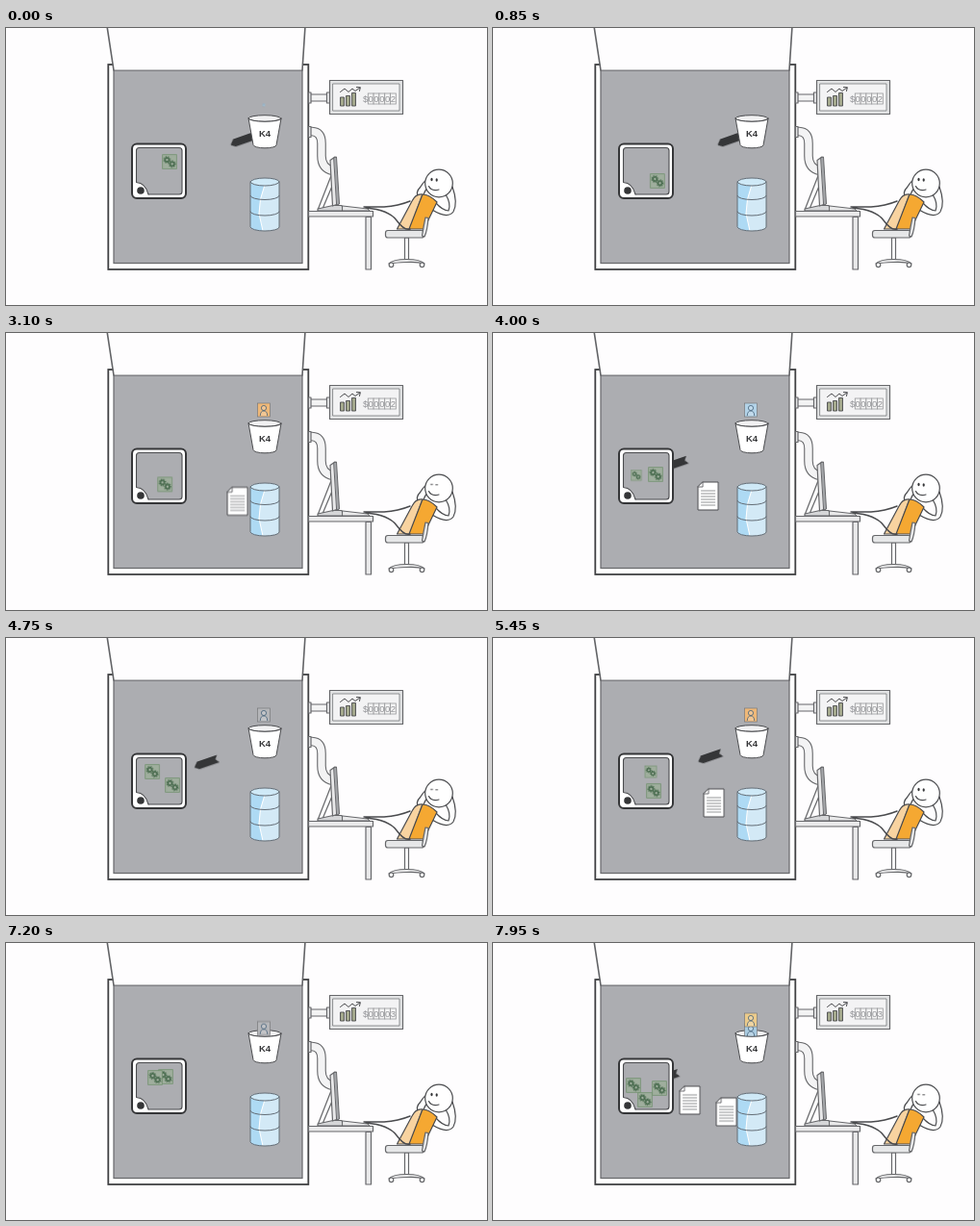
Animation, 500 px wide and 288 px high, one loop 8000 ms. Source, as an HTML page without scripts:

```html
<!DOCTYPE html>
<html lang="en">
<head>
<meta charset="utf-8">
<title>Workers, bucket and database</title>
<style>
html, body { margin: 0; width: 100%; height: 100%; overflow: hidden; background: #fff; }
svg { display: block; width: 500px; height: 288px; font-family: "Liberation Sans", Arial, sans-serif; }
.ink { fill: none; stroke: #4a4b4e; stroke-width: 1.2; stroke-linecap: round; stroke-linejoin: round; }
.soft { stroke: #66676a; }

/* Each traveller runs once per loop, starting at --t milliseconds */
.run { animation: 8s linear calc(var(--t) * 1ms - 8000ms) infinite; }
.arrow { animation-name: arrow; }
.doc { animation-name: doc; }
.pic { animation-name: pic; }
/* Travellers cut by the loop point show in one half only */
.early { animation: half 8s step-end infinite; }
.late { animation: half 8s step-end -4s infinite; }

@keyframes arrow {
  0% { transform: translate(270px, 108px); opacity: 1; }
  8.75% { transform: translate(172px, 142px); opacity: 1; }
  8.76%, 100% { transform: translate(172px, 142px); opacity: 0; }
}
@keyframes doc {
  0% { transform: translate(160px, 138px); opacity: 1; }
  12.5% { transform: translate(260px, 170px); opacity: 1; }
  12.51%, 100% { transform: translate(260px, 170px); opacity: 0; }
}
@keyframes pic {
  0% { transform: translate(268px, 80px) scale(0); opacity: 1; }
  2.5%, 5.5% { transform: translate(268px, 80px); opacity: 1; }
  10% { transform: translate(268px, 108px); opacity: 1; }
  10.01%, 100% { transform: translate(268px, 108px); opacity: 0; }
}
@keyframes half { 0% { opacity: 1; } 50%, 100% { opacity: 0; } }

.gear { animation: 8s linear infinite; }
.g1 { animation-name: g1; }
.g2 { animation-name: g2; }
.g3 { animation-name: g3; }
@keyframes g1 {
  0% { transform: translate(170px, 139px); }
  10.6% { transform: translate(171px, 159px); }
  18% { transform: translate(150px, 160px); }
  22% { transform: translate(147px, 152px); }
  26.9% { transform: translate(162px, 141px); }
  32% { transform: translate(171px, 140px); }
  39% { transform: translate(165px, 158px); }
  50% { transform: translate(169px, 147px); }
  58% { transform: translate(174px, 152px); }
  68.1% { transform: translate(167px, 159px); }
  80% { transform: translate(177px, 142px); }
  90% { transform: translate(166px, 139px); }
  99.4%, 100% { transform: translate(173px, 151px); }
}
@keyframes g2 {
  0%, 47.5% { transform: translate(149px, 148px) scale(0); }
  50% { transform: translate(149px, 148px) scale(.72); }
  51.5% { transform: translate(149px, 147px); }
  58% { transform: translate(150px, 139px); }
  66% { transform: translate(162px, 139px); }
  68.1% { transform: translate(164px, 139px) scale(.8); }
  70% { transform: translate(163px, 139px); }
  80% { transform: translate(147px, 149px); }
  90% { transform: translate(155px, 140px); }
  99.4%, 100% { transform: translate(146px, 148px); }
}
@keyframes g3 {
  0%, 90% { transform: translate(166px, 160px) scale(0); }
  93% { transform: translate(164px, 161px); }
  99.4%, 100% { transform: translate(158px, 163px); }
}
.spin { animation: spin 2s linear infinite; }
.back { animation-direction: reverse; }
@keyframes spin { to { transform: rotate(360deg); } }

.eye { transform-box: fill-box; transform-origin: center; animation: blink 8s step-end infinite; }
@keyframes blink {
  0%, 18.125%, 30.6%, 39.4%, 48.1%, 60.6%, 84.4% { transform: none; }
  16.25%, 28.75%, 37.5%, 46.25%, 58.75%, 82.5%, 98.1%, 100% { transform: scale(1.5, .3); }
}
.roll { animation: roll 8s ease-in-out infinite; }
@keyframes roll {
  0%, 62% { transform: none; }
  65.6%, 100% { transform: translateY(-11px); }
}
.digits { font-size: 9.5px; fill: #939498; text-anchor: middle; }
</style>
</head>
<body>
<svg viewBox="0 0 500 288">
<defs>
  <g id="arrow"><path transform="rotate(-19)" d="M-13.5 1L-9-4H13L10 0 13 4.2H-9Z" fill="#353638"/></g>
  <g id="doc">
    <path class="ink" style="fill:#fff;stroke-width:1" d="M5 0H21V29H0V5Z"/>
    <path class="ink" style="stroke-width:.8" d="M0 5H5V0"/>
    <path d="M3 9H18M3 12H18M3 15H18M3 18H18M3 21H18M3 24H18" stroke="#8a8b8e" stroke-width=".9"/>
  </g>
  <g id="pic">
    <rect x="-6.5" y="-7" width="13" height="14" fill="currentColor" stroke="#77787b" stroke-width=".7"/>
    <g fill="#fff" fill-opacity=".2" stroke="#46627a" stroke-width=".8">
      <circle cy="-2" r="2.6"/>
      <path d="M-3.7 6Q-3.5 1 0 1T3.7 6"/>
    </g>
  </g>
  <g id="cog" fill="none" stroke="#46694c">
    <circle r="2.1" stroke-width="1.5"/>
    <circle r="3.2" stroke-width="1.3" stroke-dasharray="1.3 1.21"/>
  </g>
  <g id="gear">
    <rect x="-7.3" y="-7.3" width="14.6" height="14.6" fill="#9fae9d" stroke="#72916f" stroke-width=".8"/>
    <g transform="translate(-2.6 -2)"><g class="spin"><use href="#cog"/></g></g>
    <g transform="translate(2.7 2.3)"><g class="spin back"><use href="#cog"/></g></g>
  </g>
  <rect id="cell" y="68" width="5.8" height="11" fill="#f4f4f4" stroke="#97989b" stroke-width=".8"/>
  <clipPath id="slot"><rect x="399.5" y="68" width="6" height="11"/></clipPath>
  <clipPath id="inside"><rect x="136" y="125" width="46.5" height="47.5"/></clipPath>
  <clipPath id="can"><path d="M254 160A15 4 0 0 1 284 160V207A15 4 0 0 1 254 207Z"/></clipPath>
</defs>

<rect width="500" height="288" fill="#fefdfe"/>

<!-- Room -->
<rect x="106.3" y="38" width="208" height="213" fill="#fff" stroke="#414244" stroke-width="1.8"/>
<rect x="112" y="44" width="196" height="200.5" fill="#acadb1" stroke="#66676a" stroke-width="1.2"/>
<path d="M105 -2L112 43.3H308L311 -2Z" fill="#fefdfe"/>
<path class="ink" style="stroke:#626366;stroke-width:1.6" d="M105 -2L112 44M311 -2L308 44"/>

<!-- Upper pipe and display -->
<g class="ink soft" style="fill:#f3f3f4">
  <rect x="316" y="69" width="20" height="7"/>
  <rect x="314.5" y="67" width="2.500" height="11"/>
  <rect x="333.500" y="67" width="3" height="11"/>
  <rect x="336.500" y="54.500" width="76" height="35" style="fill:#e2e3e4"/>
  <rect x="340" y="58" width="69" height="28" style="fill:#f3f3f4;stroke-width:.7"/>
</g>
<path fill="#a3a88c" stroke="#4a4b4e" stroke-width=".9" d="M347.500 72H351.500V81H347.500ZM353.500 70.500H357.500V81H353.500ZM359.500 67.500H363.500V81H359.500Z"/>
<path class="ink" style="stroke-width:1" d="M347.500 66.500L352 63 356 66.500 360 63 363 65.500 368 62M364.500 61.500L368.300 61.800 367.500 65.500"/>
<g class="digits">
  <text x="373.700" y="77">$</text>
  <use href="#cell" x="376.300"/><use href="#cell" x="382.100"/><use href="#cell" x="387.900"/><use href="#cell" x="393.700"/><use href="#cell" x="399.500"/>
  <text y="77" x="379.200">0</text><text y="77" x="385">0</text><text y="77" x="390.800">0</text><text y="77" x="396.600">0</text>
  <g clip-path="url(#slot)"><g class="roll"><text x="402.400" y="77">2</text><text x="402.400" y="88">3</text></g></g>
</g>

<!-- Lower pipe, monitor and desk -->
<g fill="none">
  <path id="hose" d="M316 107.500H318Q328 108 328 120V133Q328 146 340 148.500" stroke="#66676a" stroke-width="9.600"/>
  <path d="M316 107.500H318Q328 108 328 120V133Q328 146 340 148.500" stroke="#f3f3f4" stroke-width="7.400"/>
</g>
<g class="ink soft">
  <rect style="fill:#f3f3f4" x="314.500" y="102.500" width="2.500" height="11"/>
  <path style="fill:#e9e9ea" d="M374 196.500H379.500V251H374Z"/>
  <path style="fill:#e9e9ea" d="M314.500 190.500H381.500V196H314.500Z"/>
  <path style="fill:#fff" d="M339 151L324.500 188H329L340 162Z"/>
  <path style="fill:#d5d6d8" d="M324 190V188L340 184.500H349L351 190Z"/>
  <path style="fill:#e9e9ea" d="M337 137.500L342 134 345 183 339.500 185Z"/>
  <path style="fill:#a7a9ac;stroke-width:1" d="M341 134.800L343.500 134 346.500 183 344 184Z"/>
  <path style="fill:#e9e9ea;stroke-width:1" d="M350 185L376 188 378 190H350Z"/>
</g>

<!-- Chair and person -->
<g class="ink">
  <g class="soft">
    <path style="fill:#fff" d="M414.500 218H418.500V241H414.500Z"/>
    <path style="fill:#e9e9ea" d="M398 245Q402 240.500 416.500 240.500T435 245Q428 243 416.500 243.500T398 245Z"/>
    <g style="fill:#fff"><circle cx="400.500" cy="246.300" r="2.300"/><circle cx="432.500" cy="246.300" r="2.300"/></g>
  </g>
  <path style="fill:#fff" d="M429 176Q425 171 431 165Q435 158 440 157V164Q435 169 434 174Z"/>
  <path style="fill:#fff" d="M446 181Q454 190 460 190Q463 183 457 173L464 165Q470 182 465 191Q459 199 443 189Z"/>
  <path style="fill:#f8d3a0" d="M406.500 209L422 180Q426 172 433 173L420 209Z"/>
  <path style="fill:#f5a832" d="M419 209L433 173Q440 173 448 181L434.500 209Z"/>
  <path style="stroke-width:1.400" d="M372 186H393Q408 185 420 180M374 187Q398 189 406 200T420 209"/>
  <g class="soft">
    <rect style="fill:#e6e7e8" x="394.500" y="210.500" width="40" height="7.500" rx="2.500"/>
    <path style="fill:#e6e7e8" d="M432.500 216Q434 206 436 197L439 197.500Q438 211 435 217Z"/>
  </g>
  <circle style="fill:#fff" cx="450" cy="161.500" r="14.300"/>
  <path d="M439.500 164.500Q442 170 450 168"/>
</g>
<g fill="#353638">
  <ellipse class="eye" cx="442.500" cy="157.500" rx="1.100" ry="1.700"/>
  <ellipse class="eye" cx="447.700" cy="158" rx="1.100" ry="1.700"/>
</g>

<!-- Arrows and pages pass behind the containers -->
<g class="early"><use href="#arrow" class="run arrow" style="--t:-171"/></g>
<use href="#arrow" class="run arrow" style="--t:679"/>
<use href="#arrow" class="run arrow" style="--t:2094"/>
<use href="#arrow" class="run arrow" style="--t:3429"/>
<use href="#arrow" class="run arrow" style="--t:4310"/>
<use href="#arrow" class="run arrow" style="--t:5135"/>
<use href="#arrow" class="run arrow" style="--t:6085"/>
<use href="#doc" class="run doc" style="--t:950"/>
<use href="#doc" class="run doc" style="--t:2400"/>
<use href="#doc" class="run doc" style="--t:3470"/>
<use href="#doc" class="run doc" style="--t:4860"/>
<use href="#doc" class="run doc" style="--t:5870"/>
<g class="late">
  <use href="#arrow" class="run arrow" style="--t:7314"/>
  <use href="#doc" class="run doc" style="--t:7230"/>
  <use href="#doc" class="run doc" style="--t:7610"/>
</g>

<!-- Worker box -->
<rect x="131" y="120.500" width="56" height="56.500" rx="5" fill="#fff" stroke="#353638" stroke-width="2"/>
<rect x="135.500" y="124.500" width="47.500" height="48.500" rx="3" fill="#acadb1" stroke="#4a4b4e" stroke-width="1.100"/>
<g clip-path="url(#inside)">
  <use href="#gear" class="gear g1"/>
  <use href="#gear" class="gear g2"/>
  <use href="#gear" class="gear g3"/>
</g>
<path d="M134 160Q145 160 148 174H136Q134 174 134 172Z" fill="#fff"/>
<path class="ink" style="stroke-width:1.100" d="M135.500 160.500Q145 161 148 173"/>
<circle cx="140" cy="169" r="3.800" fill="#353638"/>

<!-- Bucket with pictures dropping in -->
<ellipse class="ink" style="fill:#f1f1f2;stroke-width:1" cx="269" cy="94" rx="17" ry="3.300"/>
<g class="early"><use href="#pic" class="run pic" style="--t:-40" color="#a9cbe0"/></g>
<use href="#pic" class="run pic" style="--t:1440" color="#b5b6b9"/>
<use href="#pic" class="run pic" style="--t:2700" color="#efb878"/>
<use href="#pic" class="run pic" style="--t:3680" color="#b3d3e8"/>
<use href="#pic" class="run pic" style="--t:4450" color="#b5b6b9"/>
<use href="#pic" class="run pic" style="--t:5130" color="#efb878"/>
<use href="#pic" class="run pic" style="--t:5820" color="#948b8b"/>
<use href="#pic" class="run pic" style="--t:6000" color="#86aecb"/>
<use href="#pic" class="run pic" style="--t:6650" color="#b5b6b9"/>
<g class="late">
  <use href="#pic" class="run pic" style="--t:7370" color="#a9cbe0"/>
  <use href="#pic" class="run pic" style="--t:7550" color="#eccb8b"/>
</g>
<path class="ink" style="fill:#fff;stroke-width:1" d="M252 94A17 3.300 0 0 0 286 94L281 121.800A12 3 0 0 1 257 121.800Z"/>
<text x="269" y="113" font-size="9.500" font-weight="bold" text-anchor="middle" fill="#353638">K4</text>

<!-- Database -->
<g clip-path="url(#can)">
  <rect x="254" y="155" width="30" height="57" fill="#d3e9f6"/>
  <path d="M254 160L269 163Q263 178 263 193L267 211H254Z" fill="#aedaf4"/>
  <path d="M269 163Q263 178 263 193L267 211" fill="none" stroke="#fff" stroke-width="1"/>
</g>
<ellipse cx="269" cy="160" rx="15" ry="4" fill="#cfe9f7"/>
<path class="ink" style="stroke:#636c75;stroke-width:1" d="M254 160A15 4 0 0 1 284 160V207A15 4 0 0 1 254 207ZM254 160A15 4 0 0 0 284 160M254 174.500A15 4 0 0 0 284 174.500M254 191A15 4 0 0 0 284 191"/>
</svg>
</body>
</html>
```
